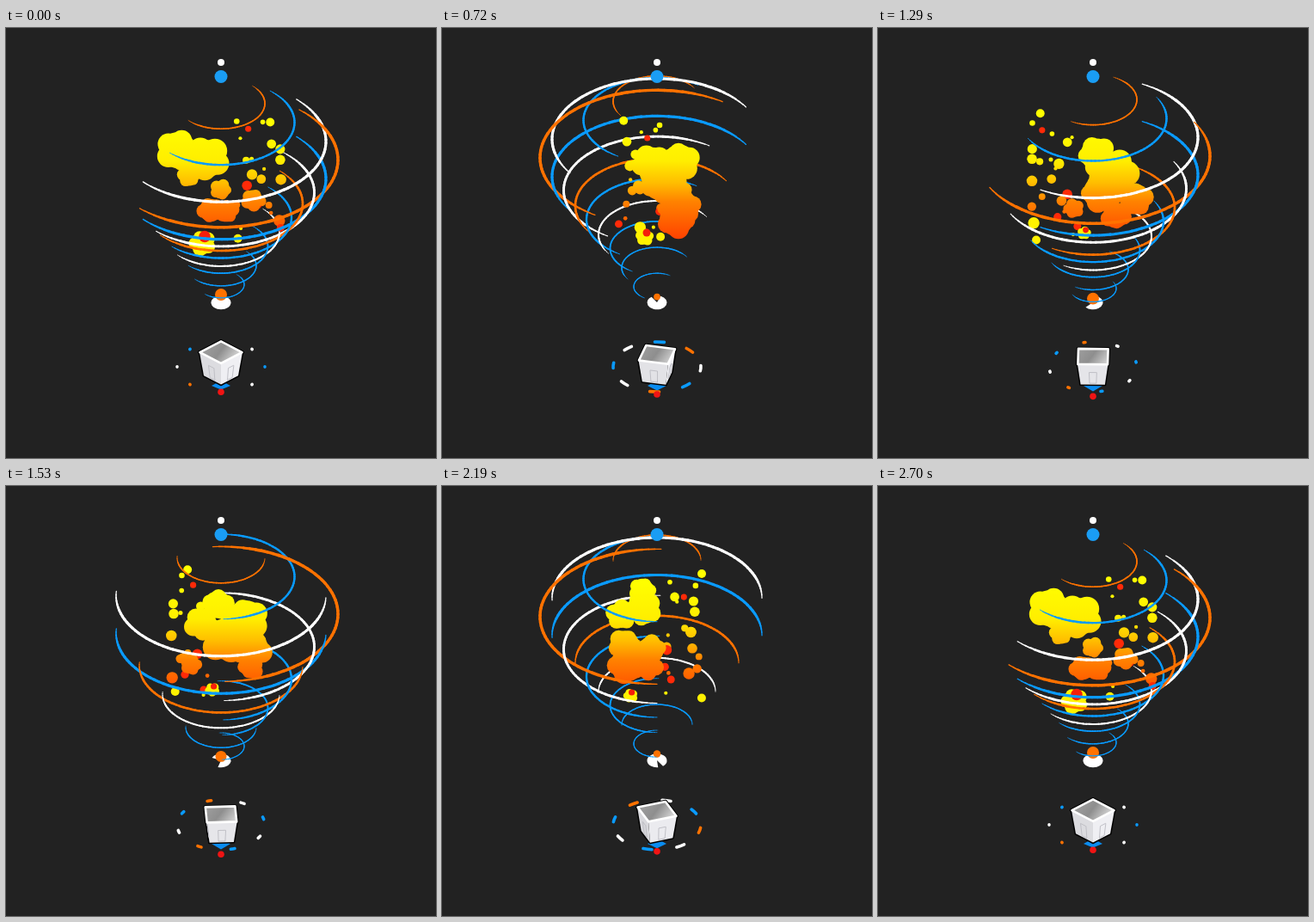
Write an HTML page with a canvas that moves like this. It is 500 px wide and 500 px high and loops after 2.73 s.

```html
<!DOCTYPE html>
<html>
<head>
<meta charset="utf-8">
<style>
  html, body { margin: 0; width: 100%; height: 100%; overflow: hidden; background: #222; }
  canvas { display: block; }
</style>
</head>
<body>
<canvas id="stage" width="500" height="500"></canvas>
<script>
const ctx = document.getElementById('stage').getContext('2d');
const TAU = Math.PI * 2, DEG = TAU / 360, FLAT = 0.577, CX = 250;
const ORANGE = '#ff7200', BLUE = '#0a9bff', WHITE = '#fff', RED = '#f01414', YELLOW = '#fff200';
const { sin, cos, abs, min, floor } = Math;

// Rings from top to bottom: height, radius, colour
const rings = [
  [85.5, 51, ORANGE], [107.5, 85.5, BLUE], [129.5, 122, WHITE], [151, 136, ORANGE],
  [173, 122, BLUE], [189, 108.5, WHITE], [206.5, 95, ORANGE], [222.5, 82, BLUE],
  [240, 68, WHITE], [256, 54.5, BLUE], [278.5, 41, BLUE], [300.5, 27, BLUE]
];

// Poses of the large lumps, x, y, r for every key step
const keySteps = [0, 13, 35, 51, 64, 73, 90];
const lumps = [
  [200,142,24, 226,160,20, 262,156,24, 246,138,18, 238,134,19, 233,121,15],
  [233,152,25, 264,162,25, 288,148,19, 228,160,19, 262,138,17, 234,143,20],
  [213,172,13, 240,175,23, 270,180,29, 279,155,25, 222,154,24, 209,150,17],
  [250,188,12, 289,182,13, 262,205,18, 255,178,27, 250,172,27, 213,184,18],
  [238,212,15, 250,208,22, 313,208,17, 285,190,23, 225,188,22, 215,208,22],
  [256,213,14, 277,220,25, 268,225,19, 285,211,14, 206,195,18, 243,190,17],
  [287,200,13, 288,208,13, 240,212,11, 215,208,12, 280,196,14, 239,209,17],
  [228,250,15, 232,246,13, 240,240,7, 240,237,8, 301,234,6, 219,244,8]
];

// Value at a step, running through the key poses and back to the first one
function track(values, step, size = 1, part = 0) {
  let k = 0;
  while (k < 5 && step > keySteps[k + 1]) k++;
  const u = (step - keySteps[k]) / (keySteps[k + 1] - keySteps[k]);
  const from = values[k * size + part], to = values[(k + 1) % 6 * size + part];
  return from + (to - from) * u;
}

const random = i => { const v = sin(i * 127.1 + 3.7) * 43758.5453; return v - floor(v); };

function ball(x, y, r, fill) {
  ctx.fillStyle = fill;
  ctx.beginPath();
  ctx.arc(x, y, r, 0, TAU);
  ctx.fill();
}

function polygon(points, fill, stroke, width) {
  ctx.beginPath();
  points.forEach(p => ctx.lineTo(p[0], p[1]));
  ctx.closePath();
  if (fill) { ctx.fillStyle = fill; ctx.fill(); }
  if (stroke) { ctx.strokeStyle = stroke; ctx.lineWidth = width; ctx.stroke(); }
}

function linear(x0, y0, x1, y1, stops) {
  const g = ctx.createLinearGradient(x0, y0, x1, y1);
  stops.forEach(([at, color]) => g.addColorStop(at, color));
  return g;
}

const fire = linear(0, 110, 0, 245, [
  [0, '#ffff00'], [0.33, '#ffee00'], [0.52, '#ffbd00'], [0.68, '#ff8200'], [1, '#ff4200']
]);

function drawRings(step, theta, front) {
  const turn = step ? step * 8 : 2, parts = 60;
  ctx.lineCap = 'round';
  rings.forEach(([height, r, color], i) => {
    const y = height + 2.3 * cos(theta) * (i < 6 ? 1 : -1);
    const start = 45 + (i % 2 ? -turn : turn) - 91;
    ctx.strokeStyle = color;
    for (let k = 0; k < parts; k++) {
      const a = (start + k * 182 / parts) * DEG, b = a + 182 / parts * DEG;
      if (sin((a + b) / 2) > 0 !== front) continue;
      ctx.lineWidth = (0.6 + r * 0.021) * min(1, 0.35 + 1.8 * sin((k + 0.5) / parts * Math.PI));
      ctx.beginPath();
      ctx.ellipse(CX, y, r, r * FLAT, 0, a, b);
      ctx.stroke();
    }
  });
}

function drawLump(x, y, r, seed, theta, fill) {
  ball(x, y, r * 0.88, fill);
  for (let i = 0; i < 5; i++) {
    const a = i * TAU / 5 + seed * 1.7 + theta;
    ball(x + cos(a) * r * 0.58, y + sin(a) * r * 0.5, r * (0.42 + 0.15 * random(i + seed * 9)), fill);
  }
}

function drawFire(step, theta) {
  const count = 24;
  for (let i = 0; i < count; i++) {
    const spin = theta * (1 + i % 2) + random(i) * TAU;
    const x = CX + 46 * cos(theta + 0.35) + (14 + 14 * random(i + 40)) * cos(spin);
    const y = 104 + i / count * 145 + 7 * sin(spin);
    const fill = i % 11 === 3 || (y > 205 && i % 3 === 0) ? '#ff2a08' : y > 225 ? YELLOW : fire;
    ball(x, y, 2 + 5 * random(i + 80), fill);
  }
  for (let i = lumps.length - 1; i >= 0; i--) {
    const [x, y, r] = [0, 1, 2].map(part => track(lumps[i], step, 3, part));
    drawLump(x, y, r, i, theta, i === 7 ? YELLOW : fire);
    if (i === 7) ball(x + r * 0.2, y - r * 0.5, r * 0.45, '#f51e0a');
  }
}

function drawDish(theta, step) {
  const gap = 50 * (1 - cos(theta)) * DEG, middle = (360 - step * 4) * DEG;
  ctx.fillStyle = WHITE;
  ctx.beginPath();
  if (gap > 0.02) ctx.moveTo(CX, 319);
  ctx.ellipse(CX, 319.3, 11.5, 8, 0, middle + gap / 2, middle + TAU - gap / 2);
  ctx.fill();
  ball(CX, 312.3 - 2.3 * cos(theta), 5.4 + 1.6 * cos(2 * theta), ORANGE);
}

function drawOrbit(step, theta, front) {
  const colors = [BLUE, WHITE, BLUE, ORANGE, WHITE, BLUE, ORANGE, WHITE];
  const turn = 180 - 180 * cos(theta) + track([0, -12, -19, 0, -14, -10], step);
  const half = (0.2 + 6 * abs(sin(theta))) * DEG;
  ctx.lineCap = 'round';
  ctx.lineWidth = 3.6;
  colors.forEach((color, i) => {
    const a = (i * 45 + turn) * DEG;
    if (sin(a) > 0 !== front) return;
    ctx.strokeStyle = color;
    ctx.beginPath();
    ctx.ellipse(CX, 394, 51, 29, 0, a - half, a + half);
    ctx.stroke();
  });
}

function drawBin(step, theta) {
  const yaw = -step - 7 * sin(theta), c = cos(theta);
  const topY = 379.6 - 2.5 * c, bottomY = 405.7 - 1.5 * c;
  const corner = (k, y, r) => [CX + r * cos((yaw + k * 90) * DEG), y + r * 0.52 * sin((yaw + k * 90) * DEG)];
  const square = (y, r) => [0, 1, 2, 3].map(k => corner(k, y, r));
  const mix = (p, q, u) => [p[0] + (q[0] - p[0]) * u, p[1] + (q[1] - p[1]) * u];

  polygon([[239, 416], [CX, 410], [261, 416], [CX, 421.5 - c]], '#0a8cf0');
  const sides = [];
  for (let k = 0; k < 4; k++) {
    const middle = (yaw + k * 90 + 45) * DEG;
    if (sin(middle) < 0.02) continue;
    const a = corner(k, topY, 25), b = corner(k + 1, topY, 25);
    const d = corner(k, bottomY, 20), e = corner(k + 1, bottomY, 20);
    sides.push({ face: [a, b, e, d], shade: 230 + 14 * cos(middle) });
  }
  ctx.lineJoin = 'round';
  sides.forEach(s => polygon(s.face, '#000', '#000', 3));
  polygon(square(topY, 25), '#000', '#000', 4);
  sides.forEach(({ face: [a, b, e, d], shade }) => {
    const v = floor(shade);
    polygon([a, b, e, d], `rgb(${v},${v},${v + 4})`);
    const panel = [[0.37, 0.4], [0.63, 0.4], [0.63, 0.94], [0.37, 0.94]]
      .map(([u, w]) => mix(mix(a, b, u), mix(d, e, u), w));
    polygon(panel, null, '#bcbcc2', 0.9);
  });
  polygon(square(topY, 24.5), linear(230, topY - 12, 262, topY + 12, [[0, '#a2a2a2'], [0.55, '#8e8e8e'], [1, '#d0d0d0']]), WHITE, 2.6);
}

function draw(now) {
  const step = floor(now % 2730 / 30), theta = step / 90 * TAU;
  ctx.fillStyle = '#222';
  ctx.fillRect(0, 0, 500, 500);

  drawRings(step, theta, false);
  drawFire(step, theta);
  drawDish(theta, step);
  drawRings(step, theta, true);
  ball(CX, 40, 4, WHITE);
  ball(CX, 56.5, 7.5, '#1a9df4');

  drawOrbit(step, theta, false);
  drawBin(step, theta);
  drawOrbit(step, theta, true);
  ball(CX, 425.8 - 2.6 * cos(theta), 3.8, RED);
}

const begin = performance.now();
function loop() {
  draw(performance.now() - begin);
  requestAnimationFrame(loop);
}
loop();
</script>
</body>
</html>
```
